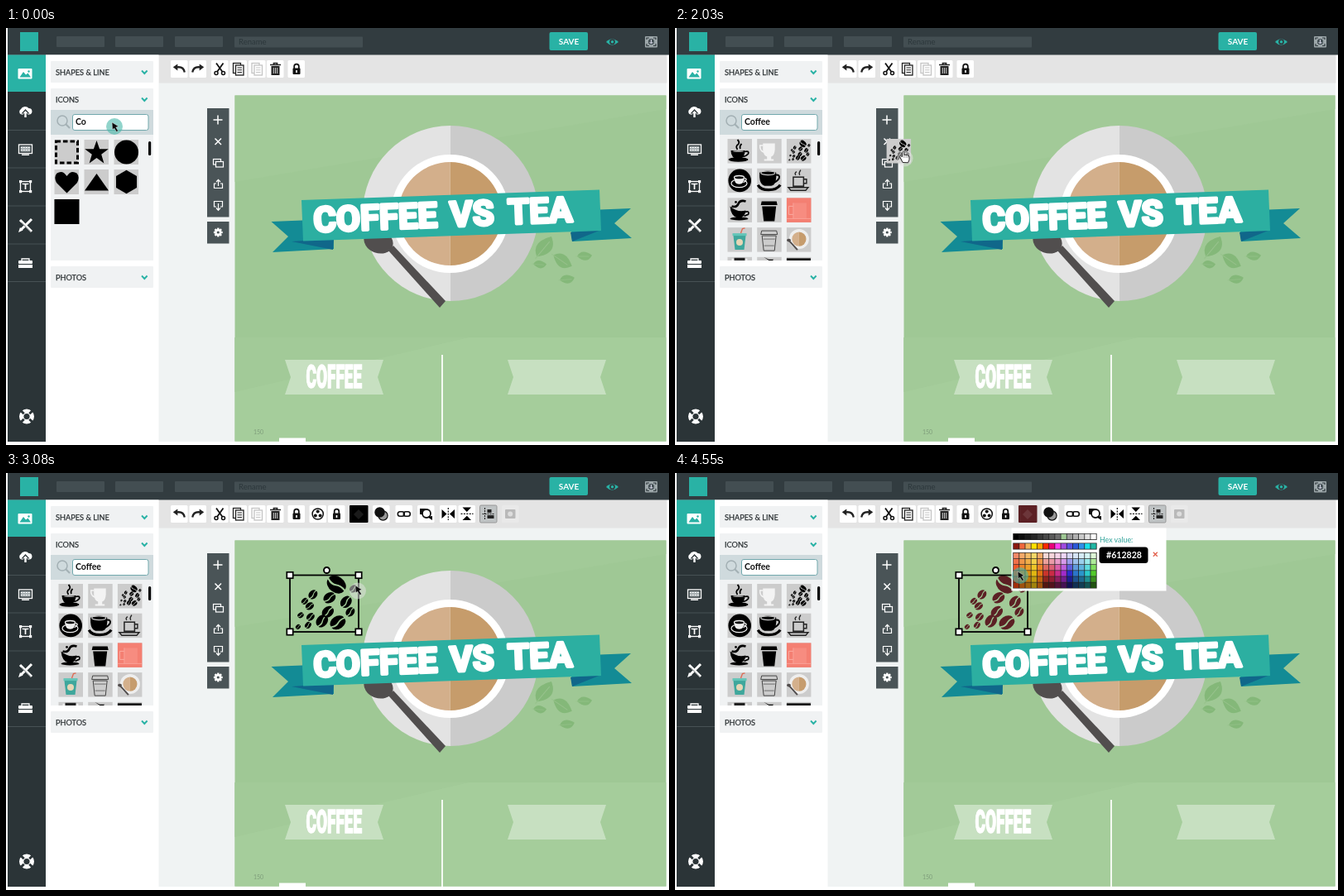
Recreate the animation shown at these times as an HTML page. Size 801x504 px, loop 4760 ms.

```html
<!DOCTYPE html>
<html lang="en">
<head>
<meta charset="utf-8">
<title>Icon search and recolour</title>
<style>
html,body{margin:0;width:100%;height:100%;overflow:hidden;background:#fff}
svg{display:block;width:100vw;height:100vh;font-family:Lato,sans-serif}
</style>
</head>
<body>
<svg id="stage" viewBox="0 0 801 504" xmlns="http://www.w3.org/2000/svg"></svg>
<script>
const LOOP = 4760, TEAL = '#29b2a5', DARK = '#2b3437';

// Shape helpers
const rect = (x, y, w, h, fill, more = '') => `<rect x="${x}" y="${y}" width="${w}" height="${h}" fill="${fill}" ${more}/>`;
const path = (d, fill = '#000', more = '') => `<path d="${d}" fill="${fill}" ${more}/>`;
const line = (d, color = '#000', w = 1.5, more = '') => path(d, 'none', `stroke="${color}" stroke-width="${w}" ${more}`);
const disc = (x, y, r, fill, more = '') => `<circle cx="${x}" cy="${y}" r="${r}" fill="${fill}" ${more}/>`;
const oval = (x, y, rx, ry, fill, more = '') => `<ellipse cx="${x}" cy="${y}" rx="${rx}" ry="${ry}" fill="${fill}" ${more}/>`;
const at = (x, y, body, more = '') => `<g transform="translate(${x} ${y}) ${more}">${body}</g>`;
const group = (id, body) => `<g id="${id}">${body}</g>`;
const text = (x, y, size, fill, body, more = '') => `<text x="${x}" y="${y}" font-size="${size}" fill="${fill}" ${more}>${body}</text>`;
const half = (x, y, r, sweep, fill) => path(`M${x} ${y - r}A${r} ${r} 0 0 ${sweep} ${x} ${y + r}Z`, fill);

// Coffee beans in an 83 x 69 box: x, y, radius
const BEANS = [[56, 12, 12], [77, 17, 5], [28, 24, 6], [48, 28, 7.6], [18, 32, 4.2], [68, 33, 7.6], [24, 38, 5.2],
  [46, 45, 7.6], [73, 45, 6], [13, 49, 3.8], [25, 51, 5.2], [39, 56, 8], [58, 58, 9.6], [10, 63, 3.2], [22, 61, 4.2]];
const HALVES = 'M-1-.08A1 .72 0 0 1 1-.16Q.4-.28 0-.05T-1-.08ZM-1 .1Q-.4 .4 0 .14T1 .02A1 .72 0 0 1-1 .1Z';
const beans = BEANS.map(([x, y, r], i) =>
  `<path d="${HALVES}" transform="translate(${x} ${y}) rotate(${i ? -32 - i % 3 * 9 : 38}) scale(${r})"/>`).join('');
const beanTile = rect(0, 0, 29.5, 29.5, '#ccc') + at(0, 1.5, beans, 'scale(.35 .38)');

function topBar() {
  return rect(2, 0, 799, 32.5, '#323c40') + rect(17, 5, 22, 23, TEAL) +
    [61, 132, 204].map(x => rect(x, 10, 58, 13, '#434e52', 'rx="1"')).join('') +
    rect(276, 10.5, 155, 13, '#434e52', 'rx="1"') + text(281, 20, 9.5, '#2c373b', 'Rename') +
    rect(656.5, 5, 46.5, 22, TEAL, 'rx="2"') +
    text(680, 19.7, 10, '#fff', 'SAVE', 'text-anchor="middle" font-weight="700"') +
    path('M725 17Q732 9.5 740 17Q732 24 725 17Z', TEAL) + disc(732.5, 16.7, 3.4, '#323c40') + disc(732.5, 16.7, 1.7, TEAL) +
    rect(772, 10, 15, 13.5, '#9da7aa', 'rx="1"') +
    line('M774 14V12H777M782 12H785V14M785 19V21.5H782M777 21.5H774V19', '#323c40', 1.2) + disc(779.5, 16.7, 3.6, '#465257') +
    line('M779.5 14V18M777.5 17L779.5 19L781.5 17', '#dde', 1);
}

function sideBar() {
  const W = '#fff';
  return rect(2, 32.5, 46, 467.5, DARK) + rect(2, 32.5, 46, 44.5, TEAL) +
    [123, 168.5, 214.5, 260.5, 306].map(y => rect(2, y, 46, 1, '#475154')).join('') +
    rect(14.5, 49, 17, 12.5, W, 'rx="1"') + path('M16.5 59.5L21 53L24 56.5L26.5 54.5L30 59.5Z', TEAL) + disc(27.5, 52.5, 1.2, TEAL) +
    path('M18.5 104.5A3.6 3.6 0 0 1 18 98A5.5 4.8 0 0 1 27.5 97A3.8 3.8 0 0 1 28.5 104.5Z', W) +
    path('M23.5 98L28.5 103.5H26V106H21V103.5H18.5Z', DARK) + path('M23.5 100L26.5 103.3H24.7V108H22.3V103.3H20.5Z', W) +
    rect(15.5, 141, 16, 10.5, 'none', `stroke="${W}" stroke-width="1.3"`) + rect(17.5, 143, 12, 6.5, '#aab2b4') +
    line('M18 144.5H30M18 147.5H30', W, 1.2, 'stroke-dasharray="1.5 1.5"') + rect(19, 152.5, 9, 1.5, W) +
    rect(17.5, 185.5, 12, 12, 'none', `stroke="${W}" stroke-width="1.3"`) +
    [[16, 184], [28, 184], [16, 196], [28, 196]].map(([x, y]) => rect(x, y, 3.2, 3.2, W)).join('') +
    line('M20.5 189V188.5H26.5V189M23.5 188.5V195', W, 1.7) +
    line('M17 232L31 246M31 231L18 244', W, 3) + line('M18.5 235L30 246.5', DARK, .7) + path('M15 247L17 241L20.5 244.5Z', W) +
    line('M19 281V279H28V281', W, 1.3) + rect(15, 281, 17, 4, W, 'rx="1"') + rect(15, 286, 17, 4, W) +
    disc(25, 469.5, 6.3, 'none', `stroke="${W}" stroke-width="5.4"`) +
    line('M18.2 462.7L21.7 466.2M31.8 462.7L28.3 466.2M18.2 476.3L21.7 472.8M31.8 476.3L28.3 472.8', DARK, 3);
}

const header = (y, label) => rect(54, y, 124, 26, '#f0f2f3', 'rx="1"') +
  text(60, y + 16.7, 9.2, '#2b3033', label, 'stroke="#2b3033" stroke-width=".25"') +
  line(`M164 ${y + 11.5}L167.3 ${y + 15}L170.6 ${y + 11.5}`, TEAL, 1.9);

function shapeTiles() {
  const art = [
    rect(2, 2, 26, 26, 'none', 'stroke="#000" stroke-width="3" stroke-dasharray="5.5 3"'),
    path('M15 1L18.6 11.3H29.3L20.7 17.7L23.9 28.5L15 22L6.1 28.5L9.3 17.7L.7 11.3H11.4Z'),
    disc(15, 15, 14.5, '#000'),
    path('M15 28.5L2.5 16Q-1 9 3 4.5Q10 0 15 8Q20 0 27 4.5Q31 9 27.5 16Z'),
    path('M15 5L29.5 25.5H.5Z'),
    path('M15 .8L27.5 8V22L15 29.2L2.5 22V8Z'),
    rect(0, 0, 30, 30, '#000')];
  return art.map((a, i) => at(58.5 + i % 3 * 36, 135 + (i / 3 | 0) * 36, rect(0, 0, 29.5, 30, '#ccc') + a)).join('');
}

function coffeeTiles() {
  const takeaway = more => path('M5.5 4H23.5L24.5 8.5H4.5ZM6 10H23L21 28H8Z', '#000', more);
  const outline = 'style="fill:none;stroke:#444;stroke-width:1"';
  const art = [
    path('M4 14H21Q21 24 13 24Q4 24 4 14Z') + oval(13, 25, 12, 2.8, '#000') + line('M20.5 15.5Q26.5 14 25 18Q22 21.5 18 21', '#000', 1.8) +
      line('M12 13Q9 9 13 6.5Q15 4 12 1M15.5 12Q14 9 17 6', '#000', 1.8) + oval(13, 15, 6.5, 1.1, '#999'),
    path('M7 5.5H21.5V13Q21 20 17 21.5V24.5H20V26.5H8.5V24.5H12V21.5Q7.5 20 7 13Z', '#f3f3f3') + line('M7 8H3.5Q3 14 8 16', '#f3f3f3', 1.5),
    '',
    disc(14.7, 14.7, 13.8, '#000') + oval(14, 18, 9.5, 5, 'none', 'stroke="#eee" stroke-width="1.2"') +
      path('M8 11H20Q20 19 14 19Q8 19 8 11Z', '#eee') + oval(14, 11, 6, 2.2, '#000', 'stroke="#eee" stroke-width="1.3"') + line('M20 12Q24 12 22 15L19 17', '#eee', 1.3),
    path('M3 5Q13 0 23 5Q24 20 17 21H9Q2 19 3 5Z') + oval(13, 5.5, 8.5, 2.4, '#000', 'stroke="#ccc" stroke-width="1.2"') +
      line('M22 8Q28 7 26.5 12Q24 16 20 17', '#000', 2) + line('M1 20Q4 26 14 26T28 20', '#000', 3.2),
    rect(8, 10.5, 12.5, 11, 'none', 'stroke="#222" stroke-width="1.5"') + line('M20.5 13H24V18H20.5M2 23H26L23 26.5H5ZM11 8Q9 6 12 4M16 8Q14 6 17 2', '#222', 1.4),
    path('M3 10Q12 18 22 15Q21 25 12 24Q4 22 3 10Z') + oval(14, 25, 11, 2, '#000') + line('M5 10Q11 12 13 7T22 4', '#000', 2.6) + line('M21 17Q27 15 25 20L20 22', '#000', 1.7) + disc(10, 5, 1.4, '#000'),
    takeaway(),
    rect(0, 0, 29.5, 29.5, '#f47f72') + rect(8, 6, 16, 19, '#f78c80') + line('M8 10H2.5V20H8', '#fbaaa0', 1) + line('M8 6V25M0 25H29.5', '#fbaaa0', .8),
    path('M7 10H22L20 27H9Z', '#3fa79c') + rect(6, 7, 17, 3, '#63c5b8') + line('M16 7L18 1.5L21 .8', '#df6c56', 1.4) + disc(14.5, 18, 4, '#e6d6b6'),
    takeaway(outline) + line('M7.5 14H21.5M8.5 22H20.5', '#555', .8),
    disc(15, 14, 12, '#eee') + half(15, 14, 8.6, 0, '#d4b08c') + half(15, 14, 8.6, 1, '#c69c6d') + line('M2 15L13 27', '#514d4d', 2) + oval(2.6, 15.5, 2.5, 1.8, '#514d4d'),
    rect(5, 2, 19, 3, '#eee') + rect(8, 1, 13, 6, '#222'),
    path('M8 0L14 3H20L17 6Z'),
    rect(0, 1.5, 29, 8, '#111')];
  return art.map((a, i) => at(63.5 + i % 3 * 35.7, 134 + (i / 3 | 0) * 35.7,
    i === 2 ? beanTile : rect(0, 0, 29.5, 29.5, '#ccc') + a)).join('');
}

function panel() {
  return rect(48, 32.5, 136.5, 467.5, '#fff') + header(40, 'SHAPES &amp; LINE') + header(73, 'ICONS') + header(288, 'PHOTOS') +
    rect(54, 99, 124, 30, '#cfdadd') + rect(54, 129, 124, 152, '#f0f2f3') +
    disc(68, 112, 6, 'none', 'stroke="#a3b0b4" stroke-width="1.5"') + line('M72.3 116.3L77 121', '#a3b0b4', 2) +
    rect(80.5, 104.5, 91.5, 19, '#fff', 'rx="2.5" stroke="#72a8ad"') +
    text(84, 116.7, 10.5, '#111', '', 'id="query" font-weight="700"') +
    `<clipPath id="list"><path d="M54 129H178V281H54Z"/></clipPath><g clip-path="url(#list)">` +
    group('shapes', shapeTiles()) + group('coffee', coffeeTiles()) + '</g>' +
    rect(172, 137, 3.2, 17, '#000', 'rx="1.5"');
}

const button = (x, body, fill = '#fff', more = '') => at(x, 39, rect(0, 0, 20.5, 21, fill, 'rx="1.5" ' + more) + body);
const undo = path('M2.8 8.2L8.3 4.4V12.4Z', '#222') + line('M7.5 8.4Q15.5 7.2 16.8 14.5', '#222', 2.3);
const lock = rect(6, 9.5, 9, 7.5, '#111', 'rx="1"') + line('M7.7 10V7.5Q7.7 4.7 10.5 4.7T13.3 7.5V10', '#111', 1.8) + rect(9.7, 12, 1.6, 3, '#fff');
const sheets = c => rect(4, 3.5, 9, 12, '#fff', `stroke="${c}" stroke-width="1.3"`) + rect(7, 6, 9.5, 12, '#fff', `stroke="${c}" stroke-width="1.3"`) +
  line('M9 9H14.5M9 11.7H14.5M9 14.5H14.5', c, 1.1);

function toolbar() {
  const basic = button(199, undo) + button(221.5, at(20.5, 0, undo, 'scale(-1 1)')) +
    button(248, line('M6 3.5L13.5 14M14.5 3.5L7 14', '#111', 1.8) + disc(6, 15.5, 2, 'none', 'stroke="#111" stroke-width="1.5"') + disc(14.5, 15.5, 2, 'none', 'stroke="#111" stroke-width="1.5"')) +
    button(270.5, sheets('#222')) + button(293, sheets('#c4c4c4')) +
    button(315, rect(5.5, 7, 10, 11, '#222') + line('M4 5.5H17M8.5 5V3.5H12.5V5', '#222', 1.7) + line('M8.3 9V16M10.5 9V16M12.7 9V16', '#fff', .8)) +
    button(340.5, lock);
  const extra = button(366.5, disc(10.2, 10.5, 6.6, '#fff', 'stroke="#111" stroke-width="1.5"') + disc(10.2, 7.5, 2, '#111') + disc(7.3, 12.5, 2, '#111') + disc(13.1, 12.5, 2, '#111')) +
    button(389, lock) +
    at(415, 39, '<rect id="fill" width="22.5" height="21" rx="1"/>' + path('M5 11L11 5L17 11L11 17Z', '#fff', 'opacity=".1"')) +
    button(443, disc(12.5, 12.5, 5.6, '#999', 'stroke="#111" stroke-width="1.2"') + disc(8.5, 8.5, 6.2, '#111')) +
    button(470.5, rect(2.8, 7.7, 8, 5.5, 'none', 'rx="2.7" stroke="#111" stroke-width="1.6"') + rect(9.8, 7.7, 8, 5.5, 'none', 'rx="2.7" stroke="#111" stroke-width="1.6"')) +
    button(497, rect(3, 4, 7, 7, '#111') + disc(11, 10, 5, '#fff', 'stroke="#111" stroke-width="1.8"') + path('M12 14L18 18V13Z')) +
    button(524, path('M2.5 5L8.5 10.5L2.5 16ZM18 5L12 10.5L18 16Z') + line('M10.3 3V18', '#111', 1.2, 'stroke-dasharray="2 1.4"')) +
    button(546.5, path('M5 2.5L10.3 8L15.5 2.5ZM5 18L10.3 12.7L15.5 18Z') + line('M3 10.4H18', '#111', 1.2, 'stroke-dasharray="2 1.4"')) +
    button(572.5, rect(9, 5, 5, 4, '#222') + rect(9, 12, 8, 4, '#222') + line('M6 3V18M3 10.5H18', '#222', 1.1, 'stroke-dasharray="2 1"'), '#bfc3c4', 'stroke="#888" stroke-width=".8"') +
    button(599, rect(4, 5, 12.5, 11, '#b9b9b9', 'rx="1"') + disc(10.2, 10.5, 3, '#ddd'), '#e9e9e9');
  return rect(184.5, 32.5, 614, 34, '#e4e4e4') + basic + group('extra', extra);
}

const leaf = (x, y, s, turn) => at(x, y, path('M-1 0Q-.4-1.15 1-.15Q.3 1.15-1 0Z', '#84b879') + line('M-1.2 0L.6 0', '#97c28c', .07), `rotate(${turn}) scale(${s})`);

function canvas() {
  const flag = x => path(`M${x} 401h119l-7 21 7 21h-119l7-21Z`, '#c7e0c1');
  const letters = 'stroke="#fff" stroke-width="3.6" stroke-linejoin="round"';
  const word = (x, body) => text(x, 0, 42, '#fff', body, letters);
  return rect(276.5, 81.5, 521, 418, '#9fc895') + path('M276.5 81.5H797.5V98L276.5 186Z', '#a2ca98') + rect(276.5, 374, 521, 125.5, '#a5cd9b') +
    path('M276.5 440L560 374H276.5Z', '#a2ca98') +
    half(537, 224, 106, 0, '#e3e3e3') + half(537, 224, 106, 1, '#cbcbcb') + disc(536.5, 224.5, 71.5, '#fff') +
    half(536.5, 224.5, 62.5, 0, '#d3af8b') + half(536.5, 224.5, 62.5, 1, '#c69c6b') +
    oval(450, 258, 18, 14, '#514e4e', 'transform="rotate(20 450 258)"') + path('M462 269L468 263L531 330L524 338Z', '#514e4e') +
    [[651, 265, 15, -50], [645, 286, 8, 5], [672, 282, 13, 35], [699, 276, 9, 0], [678, 304, 9, -5]].map(l => leaf(...l)).join('') +
    path('M320.5 234L395 231L396 267L322 271L341 252Z', '#138b95') + path('M359 257L396 256L395 268L345 258Z', '#10678a') +
    path('M755 218L681 221L684 258L756 254L735 236Z', '#138b95') + path('M682 247L719 244L684 258Z', '#10678a') +
    path('M357 208L717 195.5L719 245L359 257.5Z', '#2cafa1') +
    at(372, 246.5, `<g font-family="Roboto,sans-serif" font-weight="700">${word(0, 'COFFEE') + word(165, 'VS') + word(235, 'TEA')}</g>`, 'rotate(-2.3)') +
    flag(337) + flag(606) +
    at(362.5, 435, text(0, 0, 38, '#fff', 'COFFEE', 'font-family="Roboto,sans-serif" font-weight="900" stroke="#fff" stroke-width="1.6"'), 'scale(.5 1)') +
    rect(526, 395, 2, 105, '#f4faf2') + rect(330, 495.5, 32, 5, '#fff') + text(299, 490.5, 7, '#7f9d7b', '150');
}

function canvasTools() {
  const W = '#fff', box = (x, y, w, h) => rect(x, y, w, h, '#4a5457', `stroke="${W}" stroke-width="1.2"`);
  const teeth = [...Array(8).keys()].map(i => rect(-1.2, -5.4, 2.4, 3, W, `transform="rotate(${i * 45})"`)).join('');
  return rect(243, 97, 26.5, 131.5, '#4a5457') + rect(243, 234, 26.5, 26.5, '#4a5457') +
    line('M250.5 111H261.5M256 105.5V116.5', W, 1.5) + line('M252.5 133.5L260 141M260 133.5L252.5 141', W, 1.5) +
    box(250.5, 158.5, 9, 6.5) + box(253.5, 161.5, 9, 6.5) +
    line('M254 188H251.5V193.5H261.5V188H259M256.5 191V184M254 186L256.5 183.3L259 186', W, 1.2) +
    line('M254 216H251.5V209.5H261.5V216H259M256.5 212V220M254 217.5L256.5 220.3L259 217.5', W, 1.2) +
    at(256.3, 247, teeth + disc(0, 0, 4, W) + disc(0, 0, 1.6, '#4a5457'));
}

function selection() {
  const corners = [[343, 123.5], [426, 123.5], [343, 192], [426, 192]];
  return at(343, 123, `<g id="art">${beans}</g>`) + rect(343, 123.5, 83, 68.5, 'none', 'stroke="#000" stroke-width="1.8"') +
    corners.map(([x, y]) => rect(x - 3.7, y - 3.7, 7.4, 7.4, '#fff', 'stroke="#000" stroke-width="1.7"')).join('') +
    disc(387.5, 117.5, 3.5, '#fff', 'stroke="#000" stroke-width="1.9"');
}

function palette() {
  const hues = [14, 28, 36, 48, 28, 4, 350, 325, 285, 240, 212, 200, 180, 105];
  const bright = ['#8b1a10', '#f0683c', '#f2b35b', '#ffe100', '#ffa400', '#ff2a00', '#e9007a', '#ff3cf0', '#a04be0', '#5a50e0', '#2c58d8', '#2f8fe8', '#19e0e8', '#22b8a4'];
  const cell = (i, y, fill) => rect(409 + i * 7.18, y, 6.4, 6.5, fill);
  let out = rect(406.5, 66.5, 187, 76, '#fff') + rect(408.3, 73, 101.3, 8, '#222') + rect(408.3, 84.5, 101.3, 8, '#222') + rect(408.3, 96, 101.3, 43.5, '#222');
  hues.forEach((h, i) => {
    out += cell(i, 73.7, i === 8 ? '#9fc895' : `hsl(0 0% ${i * i * .25 + i * 4.4}%)`) + cell(i, 85.2, bright[i]);
    // Warm columns start deeper and stay brighter than the rest
    const [top, low] = i < 5 ? [68, 34] : [90, 20];
    for (let r = 0; r < 6; r++) out += cell(i, 96.7 + r * 7.15, `hsl(${h} ${i < 5 ? 85 : 65}% ${top - r * (top - low) / 5}%)`);
  });
  return out + text(513, 84, 8.8, '#2fa39a', 'Hex value:') + rect(512.5, 89.5, 59, 19.5, '#000', 'rx="3.5"') +
    text(521, 103, 10.6, '#fff', '', 'id="hex" font-weight="700"') + line('M577.8 95.7L582.8 100.7M582.8 95.7L577.8 100.7', '#e2604c', 1.3);
}

const arrow = path('M0 0L.6 8.8L2.8 7.2L5.6 11.5L7.4 10.3L4.8 6L8 5Z', '#0b0b0b', 'stroke="#fff" stroke-width=".4"');
const hand = path('M-2.5 6.5L-6-.5Q-6-2.5-3-.5V-6Q-2-8-.8-6V-2.5Q.5-3.8 1.6-2.3Q3-3.3 3.8-1.6Q5.7-2 5.6 0Q5.8 4 4 6.8Z', '#fff', 'stroke="#222" stroke-width="1"') +
  line('M-.8-2.5V1M1.6-2V1M3.8-1.4V1', '#555', .6);

document.getElementById('stage').innerHTML =
  rect(2, 0, 796, 500, '#f0f3f3') + canvas() + toolbar() + topBar() + sideBar() + panel() + canvasTools() +
  group('selection', selection()) + group('palette', palette()) + group('drag', beanTile) +
  group('pointer', group('halo', disc(0, 0, 10, '#48b8a8', 'opacity=".6"')) + group('glow', disc(0, 1.5, 10, '#e4e4e4', 'opacity=".5"')) +
    group('arrow', at(-3, -5, arrow)) + group('hand', hand));

const $ = id => document.getElementById(id);
const show = (id, on) => $(id).setAttribute('display', on ? 'inline' : 'none');

// Pointer stops: time, x, y
const STOPS = [[0, 131, 119], [910, 136, 126], [980, 141, 133], [1120, 145, 140], [1190, 149, 146], [1330, 153, 151], [1400, 157, 156],
  [2940, 424, 156], [3080, 425, 141], [3220, 426, 125], [3290, 426, 109], [3430, 427, 92], [3500, 428, 76], [3640, 431, 58],
  [3920, 427, 75], [4060, 425, 87], [4130, 422, 98], [4270, 420, 108], [4340, 418, 118], [4480, 417, 124]];

// The drag advances in pairs of half steps every 210 ms
function dragX(t) {
  const n = Math.min(5, Math.floor((t - 1540) / 210)), rest = t - 1540 - n * 210;
  return 158 + 48.8 * Math.max(0, n - (rest < 70 ? .5 : 0));
}

function draw(t) {
  const dragging = t >= 1610 && t < 2940, holding = t >= 1330 && t < 2940, red = t >= 4340;
  const glowing = t >= 1750 && t < 3710;
  const letters = t < 70 ? 2 : Math.min(6, 3 + Math.floor((t - 70) / 210));
  $('query').textContent = 'Coffee'.slice(0, letters);
  show('shapes', t < 700);
  show('coffee', t >= 700);
  show('drag', dragging);
  show('extra', t >= 2940);
  show('selection', t >= 2940);
  show('palette', t >= 3710);
  const ink = red ? '#5c2024' : '#000';
  $('art').setAttribute('fill', ink);
  $('fill').setAttribute('fill', ink);
  $('hex').textContent = red ? '#612828' : '#000000';

  let [, x, y] = STOPS.filter(s => s[0] <= t).pop();
  if (dragging) {
    x = dragX(t) + 22;
    $('drag').setAttribute('transform', `translate(${x - 22} 134)`);
  }
  $('pointer').setAttribute('transform', `translate(${x} ${y})`);
  show('hand', holding);
  show('arrow', !holding);
  show('halo', !holding && !glowing);
  show('glow', glowing);
}

const start = performance.now();
function tick() {
  draw((performance.now() - start) % LOOP);
  requestAnimationFrame(tick);
}
tick();
</script>
</body>
</html>
```
